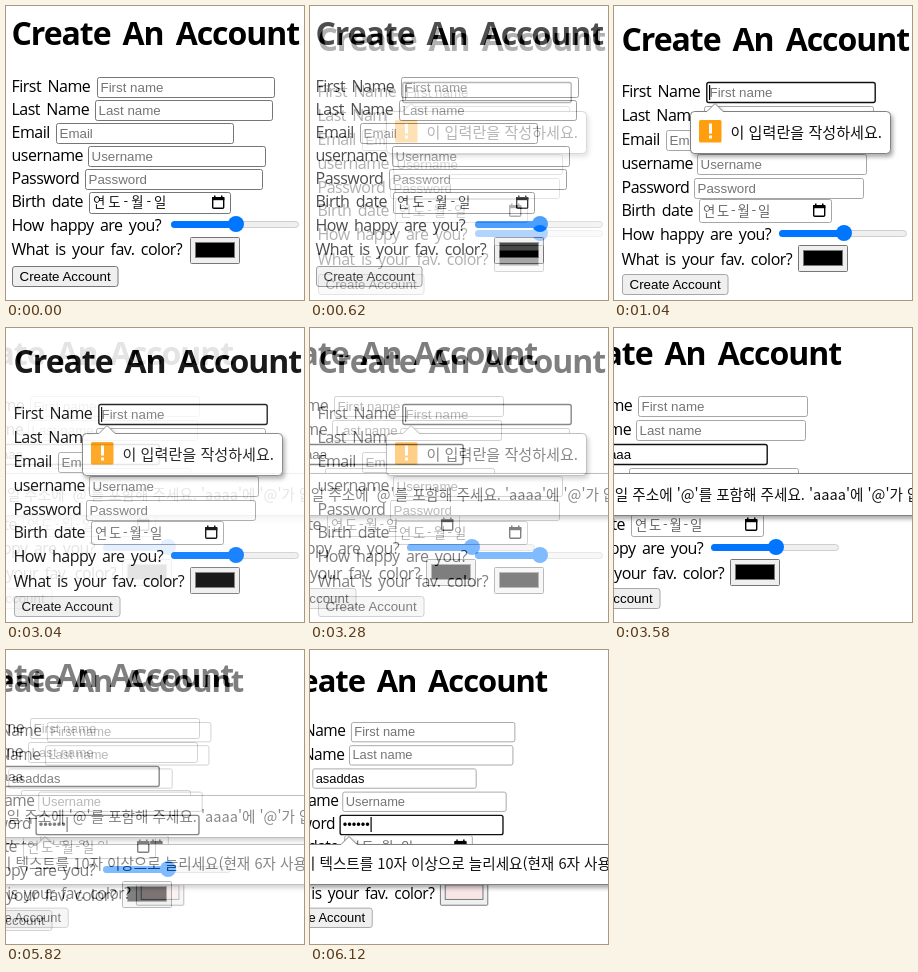
Write an HTML page that moves like this. It is 298 px wide and 294 px high and loops after 8 s.

```html
<!DOCTYPE html>
<html lang="ko">
<head>
<meta charset="utf-8">
<title>Sign-up form</title>
<style>
  html, body { margin: 0; width: 100%; height: 100%; overflow: hidden; background: #fff; }
  svg { display: block; width: 298px; height: 294px; }
  text { white-space: pre; }
  .label { font: 16px "Open Sans", sans-serif; letter-spacing: -.5px; word-spacing: 2.7px; }
  .title { font: bold 32px "Open Sans", sans-serif; letter-spacing: -1.05px; word-spacing: 4.8px; }
  .field { font: 13.333px "Liberation Sans", Arial, sans-serif; }
  .date { font: 13.333px "Noto Sans CJK KR", "Noto Sans CJK JP", sans-serif; }
  .tip { font-family: "Noto Sans CJK KR", "Noto Sans CJK JP", sans-serif; fill: #111; }
  .bubble { filter: drop-shadow(2px 3px 2px #0005); }
</style>
</head>
<body>
<svg id="stage" viewBox="0 0 298 294"></svg>
<script>
const GREY = '#757575', BLUE = '#0075ff';

const text = (x, y, s, cls, extra = '') => `<text x="${x}" y="${y}" class="${cls}" ${extra}>${s}</text>`;

// Crisp one-pixel outline between the given edges
const box = (x, y, w, h, fill = '#fff', stroke = '#767676', r = 2) =>
  `<rect x="${x + .5}" y="${y + .5}" width="${w - 1}" height="${h - 1}" rx="${r}" fill="${fill}" stroke="${stroke}"/>`;

const fill = (x, y, w, h, color, r = 0) =>
  `<rect x="${x}" y="${y}" width="${w}" height="${h}" rx="${r}" fill="${color}"/>`;

const labels = ['First Name', 'Last Name', 'Email', 'username', 'Password'];
const hints = ['First name', 'Last name', 'Email', 'Username', 'Password'];

const wide = {
  left: 5.5, title: 39, top: 71, step: 23, xs: [91, 89, 50, 82, 79], width: 178, border: '#767676',
  date: { x: 83, y: 186, w: 142, h: 22, gap: 3, base: 201, ink: '#111' },
  happy: 225, slider: 218, color: 249, swatch: 231, button: 260
};
const tall = {
  left: 7.5, title: 45, top: 76, step: 24, xs: [92, 90, 52, 83, 80], width: 170, border: '#a6a6a6',
  date: { x: 85, y: 193, w: 133, h: 24, gap: 1.8, base: 210, ink: '#666' },
  happy: 234, slider: 227, color: 259, swatch: 239, button: 268
};

function inputs(f, values, focus) {
  return labels.map((label, i) => {
    const x = f.xs[i], y = f.top + f.step * i, value = values[i];
    const frame = i === focus
      ? `<rect x="${x + .8}" y="${y + .5}" width="${f.width - 1.6}" height="20" rx="2" fill="#fff" stroke="#101010" stroke-width="1.4"/>`
      : box(x, y, f.width, 21, '#fff', f.border);
    return text(f.left, y + 15, label, 'label') + frame +
      text(x + 3.5, y + 14.7, value || hints[i], 'field', `fill="${value ? '#000' : GREY}"`);
  }).join('');
}

function dateField({ x, y, w, h, gap, base, ink }, border) {
  const cx = x + w - 19, cy = y + h / 2 - 6;
  return box(x, y, w, h, '#fff', border) +
    text(x + 4, base - .5, '연도-월-일', 'date', `letter-spacing="${gap}" fill="${ink}"`) +
    `<rect x="${cx + .7}" y="${cy + .7}" width="11" height="10.5" rx="1" fill="none" stroke="#000" stroke-width="1.4"/>` +
    fill(cx, cy, 12.4, 3.2, '#000') + fill(cx + 2, cy - 1.5, 1.5, 2, '#000') + fill(cx + 9, cy - 1.5, 1.5, 2, '#000');
}

function form(f, { values = [], focus = -1, color = '#000' } = {}) {
  const { left, slider, swatch, button } = f;
  const bx = Math.round(left + .4);
  return text(left, f.title, 'Create An Account', 'title') +
    inputs(f, values, focus) +
    text(left, f.date.base, 'Birth date', 'label') + dateField(f.date, f.border) +
    text(left, f.happy, 'How happy are you?', 'label') +
    box(165, slider - 3, 128, 7, '#efefef', '#cfcfcf', 3) +
    fill(165, slider - 3, 65, 7, BLUE, 3.5) +
    `<circle cx="230" cy="${slider}" r="8" fill="${BLUE}"/>` +
    text(left, f.color, 'What is your fav. color?', 'label') +
    box(184, swatch, 50, 27, '#efefef', '#767676', 1) +
    box(189, swatch + 5, 40, 16, color, '#777', 0) +
    box(bx, button, 106.5, 21, '#efefef', f.border, 2.5) +
    text(bx + 7.5, button + 14.5, 'Create Account', 'field');
}

// Message bubble with an optional pointer whose tip is 8px above the top edge
function bubble(x, y, w, h, tip, message) {
  const pointer = tip ? `H${tip - 8}l8 -8l8 8` : '';
  return `<path class="bubble" d="M${x + 4} ${y + .5}${pointer}H${x + w - 4}q4 0 4 4v${h - 8}q0 4 -4 4H${x + 4}q-4 0 -4 -4v${8 - h}q0 -4 4 -4z"
    fill="#fff" stroke="#808080"/>` + message;
}
const tipText = (x, y, size, s) => text(x, y, s, 'tip', `font-size="${size}"`);

const icon = fill(85, 114, 22.5, 22.5, '#ff9f10', 1.5) + fill(95, 117.5, 3, 10, '#fff') + fill(95, 129.5, 3, 3, '#fff');
const caret = (x, y) => fill(x, y, 1.2, 15, '#000');

const scenes = [
  form(wide),
  form(tall, { focus: 0 }) + caret(95, 79) +
    bubble(76.5, 105, 200, 42, 101, icon + tipText(116.5, 131.5, 15.1, '이 입력란을 작성하세요.')),
  `<g transform="translate(-68 -8)">${form(tall, { focus: 2, values: [, , 'aaaa'] })}</g>` +
    bubble(-60, 145, 420, 42, 0, tipText(-26, 171.5, 14.6, "이메일 주소에 '@'를 포함해 주세요. 'aaaa'에 '@'가 없습니다.")),
  `<g transform="translate(-48 -1.5) scale(.967)">${form(tall, { focus: 4, values: [, , 'asaddas', , '••••••'], color: '#f8e6e6' })}</g>` +
    caret(60.5, 167) +
    bubble(-60, 194, 420, 40, 39, tipText(-8, 219, 14.6, '이 텍스트를 10자 이상으로 늘리세요(현재 6자 사용 중).'))
];

const stage = document.getElementById('stage');
stage.innerHTML = scenes.map(s => `<g>${fill(0, 0, 298, 294, '#fff')}${s}</g>`).join('');
const layers = [...stage.children];

// Each following scene fades in over ten steps of 60 ms
const starts = [500, 3040, 5580];
const begin = performance.now();
function draw(now) {
  const t = Math.max(0, now - begin) % 8000;
  starts.forEach((start, i) => {
    const step = Math.floor((t - start) / 60) + 1;
    layers[i + 1].setAttribute('opacity', Math.min(10, Math.max(0, step)) / 10);
  });
  requestAnimationFrame(draw);
}
draw(begin);
</script>
</body>
</html>
```
